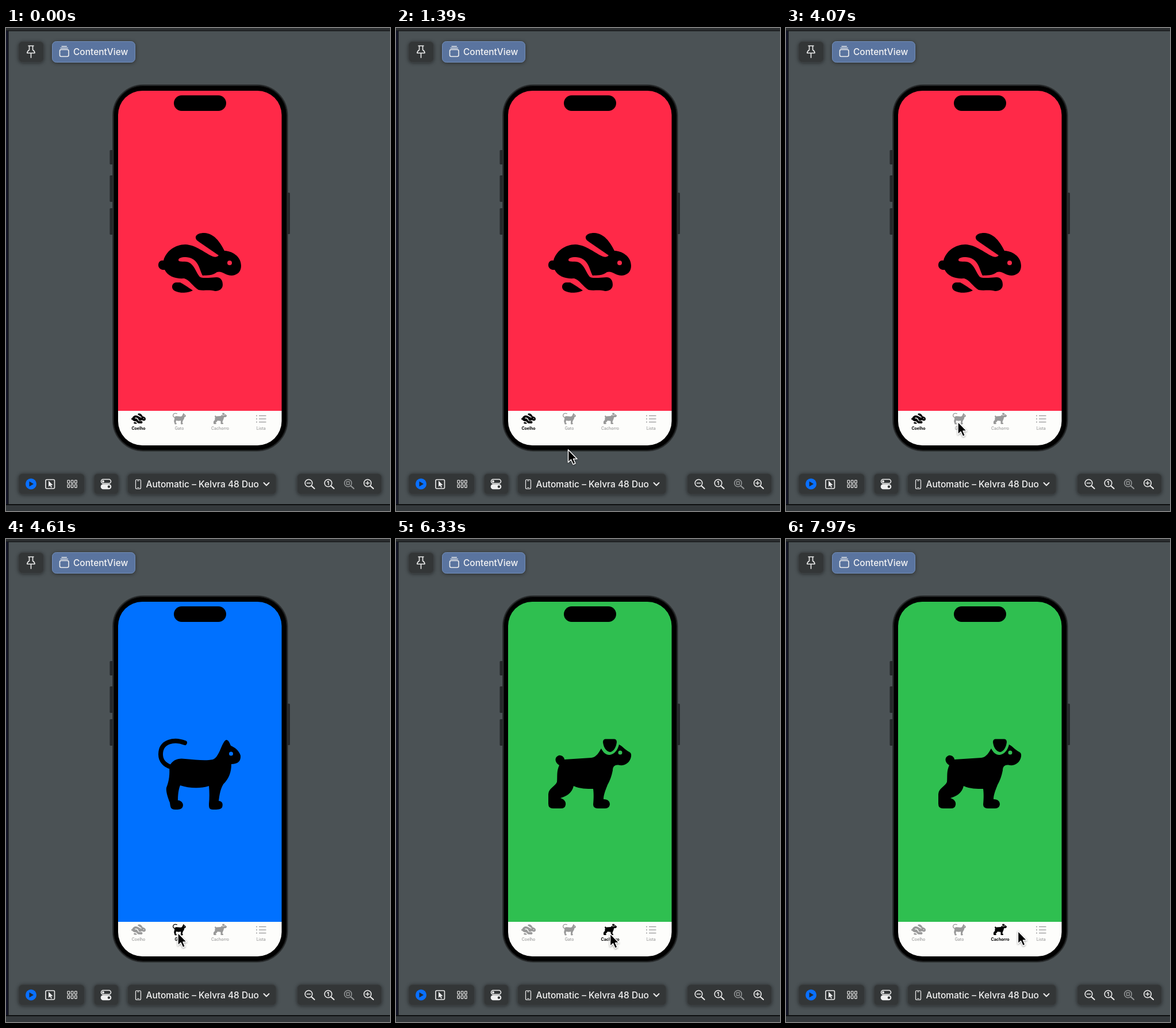
These frames come from a looping animation (668 by 839 pixels, 7990 ms). An HTML page:

```html
<!DOCTYPE html>
<html lang="en">
<head>
<meta charset="utf-8">
<title>Tab preview</title>
<style>
  html, body { margin: 0; width: 100%; height: 100%; overflow: hidden; background: #4b5255; }
  svg { display: block; width: 100vw; height: 100vh; }
  text { font-family: Inter, "Open Sans", sans-serif; }
  .panel rect { fill: #333637; stroke: #3e4244; filter: drop-shadow(0 1px 3px #0007); }
  .label { font-size: 15.5px; font-weight: 500; fill: #f4f4f4; }
  .line { fill: none; stroke: #eee; stroke-width: 1.6; stroke-linecap: round; stroke-linejoin: round; }
  .tab text { font-size: 7px; font-weight: 500; text-anchor: middle; }
</style>
</head>
<body>
<svg viewBox="0 0 668 839" preserveAspectRatio="none">
  <defs>
    <g id="rabbit">
      <path fill-rule="evenodd" d="M274 404C278 388 294 376 312 376C331 377 346 391 360 397Q367 399 370 395L335 371C326 365 329 356 345 356C362 357 372 371 380 387C392 387 409 396 409 413C409 423 403 429 393 430C381 430 376 421 367 424C358 431 350 429 342 430C336 419 335 399 313 398C304 398 300 400 300 403C300 407 308 405 314 406C326 408 329 421 336 431C339 435 346 434 352 434L366 433C374 433 377 439 377 446C377 453 371 457 364 457C352 454 345 457 335 455C325 449 320 438 310 435C296 436 282 432 276 420C270 421 265 417 265 412C265 406 269 403 274 404ZM385 408a4 4 0 1 0 8 0a4 4 0 1 0-8 0Z"/>
      <path d="M296 442L303 442C309 445 318 451 325 456C318 460 304 461 297 458C286 455 287 443 296 442Z"/>
    </g>
    <g id="cat">
      <path d="M311 354C293 347 269 351 269 374C269 386 277 393 287 396" fill="none" stroke="currentColor" stroke-width="8" stroke-linecap="round"/>
      <path fill-rule="evenodd" d="M284 395C290 383 300 380 312 382C330 383 345 386 360 383C370 379 373 362 379 353C383 346 387 348 391 359C398 362 405 367 408 376C409 386 403 391 392 391C392 405 388 416 378 426C372 436 371 448 370 455C376 455 378 460 376 466C374 470 368 470 360 470C353 470 353 466 353 460C354 450 354 440 353 429C338 434 318 433 303 428C300 435 299 445 299 454C306 454 310 461 307 466C305 470 300 470 294 470C286 470 286 465 285 458C281 448 278 438 279 432C284 420 285 408 284 395ZM388 373a3.5 3.5 0 1 0 7 0a3.5 3.5 0 1 0-7 0Z"/>
    </g>
    <g id="dog">
      <path d="M364 347.500H380Q384 348 384 353C383 362 378 370 372 370C365 369 361 361 360 353Q360 348 364 347.500Z"/>
      <path fill-rule="evenodd" d="M357 364C362 374 368 375 372 375C380 374 386 366 388 357C394 360 397 365 406 370Q410 372 409 378C407 389 398 394 389 393C380 391 377 396 377 402C375 412 372 420 368 427C364 437 361 445 361 452C369 452 372 456 372 461Q371 468 364 468H351Q343 468 343 461C344 450 344 442 343 434C332 434 320 434 309 429C306 442 296 447 286 450C293 452 296 457 295 462Q294 468 287 468H273Q265 468 265 460V443C266 432 277 430 280 422C281 412 279 404 284 393C276 388 275 379 283 376C289 375 293 380 293 383L340 380C349 379 353 370 357 364ZM386.500 371a3.500 3.500 0 1 0 7 0a3.500 3.500 0 1 0-7 0Z"/>
    </g>
    <g id="lens"><circle r="6.300"/><path d="M5 5L10 9.500" stroke-width="2.200"/></g>
    <clipPath id="glass"><rect x="195" y="109" width="284.500" height="616" rx="42"/></clipPath>
  </defs>

  <rect width="668" height="839" fill="#4b5255"/>
  <rect width="668" height="5" fill="#2b2e30"/>
  <rect y="4" width="668" height="1.500" fill="#17191a"/>
  <rect y="5" width="4" height="824" fill="#15172a"/>
  <rect x="3" y="5" width="1.500" height="824" fill="#0c0e14"/>
  <rect y="829" width="668" height="10" fill="#34393c"/>
  <rect y="827" width="668" height="2" fill="#0d0f10"/>

  <g class="panel">
    <rect x="22" y="23.500" width="43.500" height="36" rx="7"/>
    <rect x="80.500" y="23.500" width="144" height="36" rx="7" style="fill:#5a749f;stroke:#7390bd"/>
    <rect x="22" y="774" width="114.500" height="36" rx="7"/>
    <rect x="153" y="774" width="43" height="36" rx="7"/>
    <rect x="211.500" y="774" width="258.500" height="36" rx="7"/>
    <rect x="506.500" y="774" width="147" height="36" rx="7"/>
  </g>
  <g class="line">
    <path d="M39 31H48M40.500 31V38Q37 40 36.800 43.500H50Q50 40 46.500 38V31M43.500 44V51.500"/>
    <rect x="93.500" y="37.500" width="15.500" height="12" rx="2.500"/>
    <path d="M95 34.800H107.500M97 32H105.500" stroke-width="1.300"/>
    <rect x="69" y="784.500" width="15.500" height="15.500" rx="2"/>
    <g id="grid" stroke-width="1.200"></g>
    <rect x="165.500" y="784" width="17" height="7" rx="3.500"/>
    <rect x="165.500" y="793" width="17" height="7.500" rx="3.700" fill="#eee"/>
    <rect x="225.500" y="784.500" width="9" height="16" rx="2" stroke-width="1.200"/>
    <path d="M228.500 786.500H231.500M228.500 798.500H231.500" stroke-width="1"/>
    <path d="M448.500 790L453 794.500L457.500 790" stroke-width="2"/>
    <use href="#lens" x="526.500" y="790.500"/>
    <use href="#lens" x="560.500" y="790.500"/>
    <use href="#lens" x="595" y="790.500" stroke="#929596"/>
    <use href="#lens" x="629" y="790.500"/>
    <path d="M523.500 790.500H529.500M559 788.500L561 787.500V793.500M626 790.500H632M629 787.500V793.500" stroke-width="1.400"/>
    <rect x="592.500" y="788" width="5" height="5" stroke="#929596" stroke-width="1.300"/>
  </g>
  <circle cx="43.500" cy="792" r="9.500" fill="#0a70ff"/>
  <path d="M40.500 787.500L48 792L40.500 796.500Z" fill="#20272f"/>
  <path d="M74 786.500V797L76.500 794.700L78.500 798.500L80 797.800L78.200 794H81.500Z" fill="#eee"/>
  <circle cx="169" cy="787.500" r="2" fill="#eee"/>
  <circle cx="179" cy="796.700" r="2.200" fill="#333637"/>
  <text class="label" x="117" y="47">ContentView</text>
  <text class="label" x="243.500" y="797.500">Automatic – Kelvra 48 Duo</text>

  <g fill="#25282a">
    <rect x="180.500" y="212" width="6" height="25" rx="1.500"/>
    <rect x="180.500" y="256" width="6" height="46" rx="1.500"/>
    <rect x="180.500" y="313" width="6" height="46" rx="1.500"/>
    <rect x="488" y="286" width="6" height="72" rx="1.500"/>
  </g>
  <rect x="186" y="99" width="303.500" height="635.500" rx="53" fill="#000" stroke="#292c2d" stroke-width="2"/>
  <rect x="187.500" y="100.500" width="300.500" height="632.500" rx="51" fill="#000" stroke="#151617"/>
  <g clip-path="url(#glass)">
    <rect id="page" x="195" y="109" width="285" height="556"/>
    <rect x="195" y="665" width="285" height="60" fill="#fdfdfb"/>
  </g>
  <rect x="292" y="117" width="91" height="27" rx="13.500"/>
  <use id="hero"/>
  <g id="tabs"></g>
  <path id="mouse" d="M0 0V22L5 17.300L8.700 25.500L12.500 23.800L9 16H15.500Z" stroke="#fff" stroke-width="1.500" stroke-linejoin="round" style="filter:drop-shadow(0 1px 1.500px #0006)"/>
</svg>
<script>
const LOOP = 7990;
const $ = id => document.getElementById(id);

const tabs = [
  { name: 'Coelho', icon: 'rabbit', x: 230.5, scale: 0.174, color: '#ff2948', from: 0 },
  { name: 'Gato', icon: 'cat', x: 301.5, scale: 0.16, color: '#0071ff', from: 4550 },
  { name: 'Cachorro', icon: 'dog', x: 372.5, scale: 0.16, color: '#2fbf50', from: 5950 },
  { name: 'Lista', x: 443.7, from: Infinity }
];

// time, x, y
const route = [
  [900, 330, 850], [1200, 304, 748], [1390, 299.5, 732.5], [1700, 299.5, 732.5],
  [2000, 299, 690], [2150, 299, 684], [5200, 299, 684], [5490, 350.5, 690.5],
  [5750, 372.5, 685.5], [7600, 372.5, 685.5], [7970, 403.5, 681]
];

const listIcon = [673.5, 679, 684.5].map(y =>
  `<circle cx="436" cy="${y}" r="1"/><path d="M440 ${y}H452.500" stroke="currentColor" stroke-width="1.300"/>`).join('');

$('tabs').innerHTML = tabs.map(t => `<g class="tab" fill="currentColor">${
  t.icon ? `<use href="#${t.icon}" transform="translate(${t.x} 678.500) scale(${t.scale}) translate(-337 -408)"/>` : listIcon
}<text x="${t.x}" y="697.500">${t.name}</text></g>`).join('');

for (let i = 0; i < 6; i++) {
  $('grid').innerHTML += `<rect x="${107 + i % 3 * 6.3}" y="${785.5 + (i > 2) * 7.5}" width="3.600" height="5.300" rx=".8"/>`;
}

function cursorAt(t) {
  const i = route.findIndex(p => p[0] >= t);
  if (i < 0) return route[route.length - 1].slice(1);
  if (i === 0) return route[0].slice(1);
  const [a, b] = [route[i - 1], route[i]];
  const k = (t - a[0]) / (b[0] - a[0]);
  return [1, 2].map(n => a[n] + (b[n] - a[n]) * k);
}

let shown;
function select(tab) {
  if (tab === shown) return;
  shown = tab;
  $('page').setAttribute('fill', tab.color);
  $('hero').setAttribute('href', '#' + tab.icon);
  [...$('tabs').children].forEach((el, i) => {
    const on = tabs[i] === tab;
    el.style.color = on ? '#000' : '#999';
    el.lastChild.style.fontWeight = on ? 700 : 500;
  });
}

function draw(t) {
  select(tabs.filter(tab => tab.from <= t).pop());
  $('mouse').setAttribute('transform', `translate(${cursorAt(t)})`);
}

function tick() {
  draw(performance.now() % LOOP);
  requestAnimationFrame(tick);
}
tick();
</script>
</body>
</html>
```
